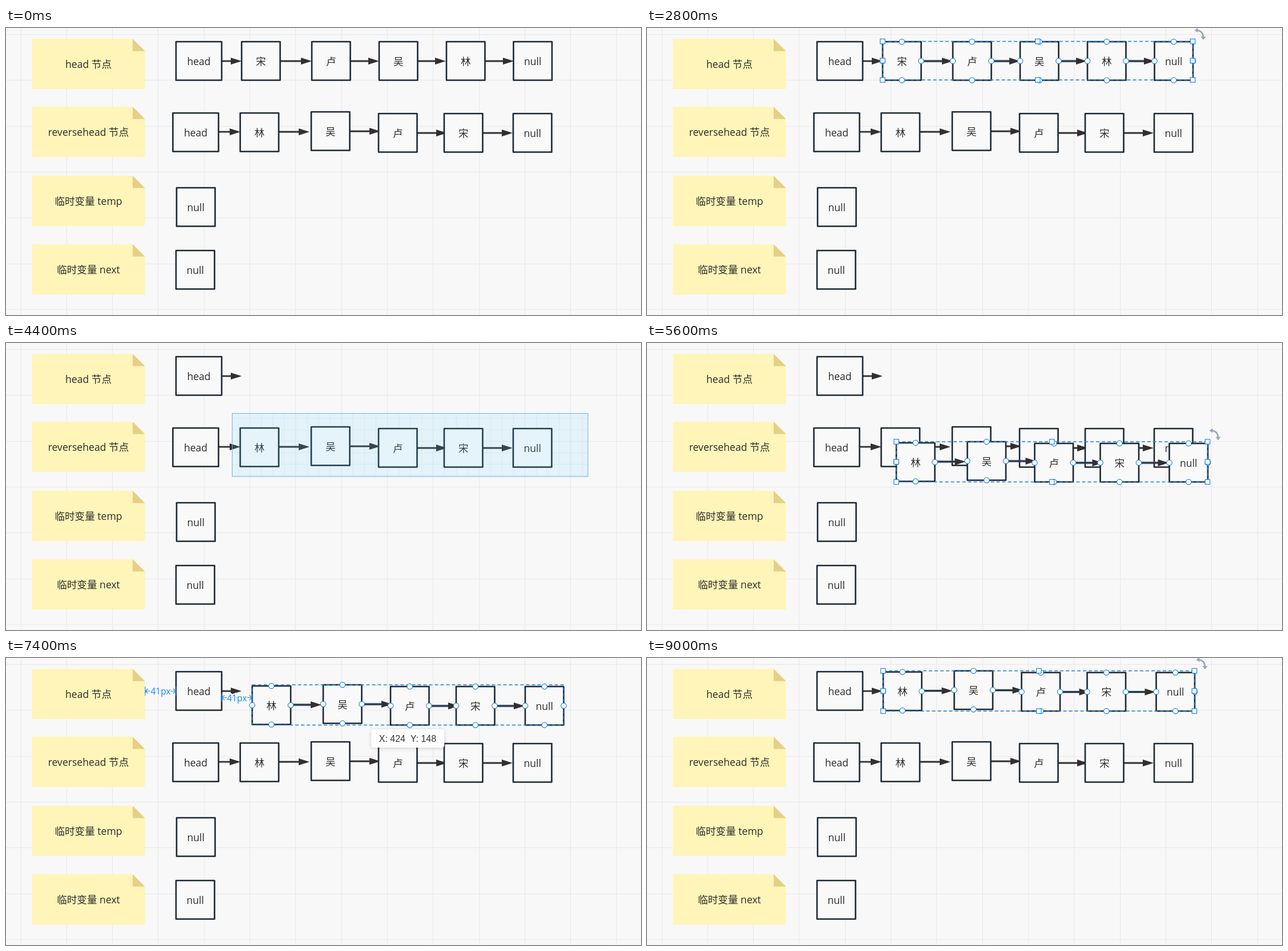
An HTML page for the animation above (9200 ms loop, 1113 by 503 pixels).

```html
<!DOCTYPE html>
<html lang="zh-CN">
<head>
<meta charset="utf-8">
<title>Linked list reversal</title>
<style>
  html, body { margin: 0; width: 100%; height: 100%; overflow: hidden; background: #f8f8f8; }
  svg { display: block; }
  text { font: 17.6px "Open Sans", "Noto Sans CJK SC", "Noto Sans CJK", sans-serif; fill: #2b2b2b; text-anchor: middle; white-space: pre; }
  .box { fill: #f9f9f9; stroke: #1c2733; stroke-width: 2.6; stroke-linejoin: round; }
  .line { stroke: #332f30; stroke-width: 2.8; }
  .tip { fill: #332f30; }
  .halo { stroke: #2a8cf0; stroke-opacity: .4; stroke-width: 5; }
  .knob { fill: #fff; stroke: #1a86e8; stroke-width: 1.2; }
  .dash { fill: none; stroke: #1a7fd8; stroke-width: 1.3; stroke-dasharray: 6 4; }
  .guide { fill: none; stroke: #1a86f0; stroke-width: 1.1; }
  .gap { font-size: 15.5px; fill: #1a86f0; stroke: #f8f8f8; stroke-width: 4; paint-order: stroke; }
  .tip-box { fill: #fff; filter: drop-shadow(0 1px 3px rgba(0, 0, 0, .18)); }
  .tip-text { font: 16px "Liberation Sans", Arial, sans-serif; fill: #333; text-anchor: start; }
</style>
</head>
<body>
<svg id="stage" width="1113" height="503" viewBox="0 0 1113 503">
  <defs>
    <pattern id="fine" x="25.5" y="11" width="20.083" height="20.083" patternUnits="userSpaceOnUse">
      <path d="M0 .5H21M.5 0V21" stroke="#e9ecef" fill="none"/>
    </pattern>
  </defs>
  <g id="base"></g>
  <g id="live"></g>
</svg>
<script>
const LOOP = 9200, TICK = 100, ZOOM = 1.32;
const GRID = 80.33, SIZE = 67.5;
const el = id => document.getElementById(id);

// Nodes are [label, x, y, width]; links are [x1, x2, y].
const heads = [["head", 298, 24, 80], ["head", 292.5, 149, 80]];
const headLinks = [[378, 413, 58], [373, 411, 182]];
const temps = [["null", 299, 280], ["null", 298, 390]];
const first = {
  nodes: [["宋", 413, 24], ["卢", 536, 24], ["吴", 654, 24], ["林", 772, 24], ["null", 889.5, 24]],
  links: [[481, 536, 58], [604, 654, 58], [722, 771, 58], [840, 890, 58]],
  frame: [413, 23.5, 543.5, 67.5]
};
const second = {
  nodes: [["林", 410.5, 149], ["吴", 535, 147], ["卢", 653, 150], ["宋", 768, 150], ["null", 889, 150]],
  links: [[479, 532, 182], [603, 656, 181], [721, 773, 184], [836, 888, 184]],
  frame: [410.5, 147, 545.5, 70.5]
};
const notes = [["head 节点", 19], ["reversehead 节点", 138], ["临时变量 temp", 259], ["临时变量 next", 379]];

// Keys are [time, x, y].
const sweepOne = [[1700, 450, 30], [1800, 640, 80], [1900, 802, 122], [2000, 910, 128], [2200, 1010, 132], [2400, 1050, 133]];
const sweepTwo = [[3800, 470, 170], [4000, 690, 240], [4100, 800, 252], [4400, 1020, 234]];
const drag = [[6700, 437, 173], [6800, 436, 174], [6900, 433, 173], [7000, 432, 160], [7200, 431, 90],
  [7400, 431.5, 47], [7700, 431, 42], [7900, 429, 40], [8300, 420, 28], [8600, 414, 22.5]];

function at(keys, t) {
  const i = keys.findIndex(k => k[0] > t);
  if (i === 0) return keys[0].slice(1);
  if (i < 0) return keys[keys.length - 1].slice(1);
  const a = keys[i - 1], b = keys[i], p = (t - a[0]) / (b[0] - a[0]);
  return [a[1] + (b[1] - a[1]) * p, a[2] + (b[2] - a[2]) * p];
}

const rect = (cls, x, y, w, h, extra = "") =>
  `<rect class="${cls}" x="${x}" y="${y}" width="${w}" height="${h}" ${extra}/>`;
const text = (s, x, y, cls = "") => `<text class="${cls}" x="${x}" y="${y}">${s}</text>`;
const path = (cls, d) => `<path class="${cls}" d="${d}"/>`;
const square = (x, y) => rect("knob", x - 4.2, y - 4.2, 8.4, 8.4);
const circle = (x, y) => `<circle class="knob" cx="${x}" cy="${y}" r="4.7"/>`;

const box = ([label, x, y, w = SIZE]) =>
  rect("box", x, y, w, SIZE) + text(label, x + w / 2, y + SIZE / 2 + 7.2);
const arrow = ([a, b, y]) =>
  path("line", `M${a} ${y}H${b - 15}`) + path("tip", `M${b} ${y}l-19 -6v12z`);
const halo = ([a, b, y]) => path("halo", `M${a} ${y}H${b - 12}`);
const each = (list, fn) => list.map(fn).join("");
const row = r => each(r.links, arrow) + each(r.nodes, box);

function ports([, x, y]) {
  const h = SIZE / 2;
  return circle(x + h, y) + circle(x + SIZE, y + h) + circle(x + h, y + SIZE) + circle(x, y + h);
}

function rotor(x, y) {
  return `<g transform="translate(${x} ${y})"><path d="M6 -19.5Q18.5 -19 18.5 -6.5" fill="none" stroke="#9aa5b8" stroke-width="2.6"/>
    <path d="M3 -19.5l6 -4v8zM18.5 -2.5l-4.5 -6h9z" fill="#9aa5b8"/></g>`;
}

function selection(r, resting = true) {
  const [x, y, w, h] = r.frame, xs = [x, x + w / 2, x + w], ys = [y, y + h / 2, y + h];
  let s = rect("dash", x, y, w, h) + each(r.nodes, ports);
  if (resting) {
    xs.forEach((px, i) => ys.forEach((py, j) => { if (i !== 1 || j !== 1) s += square(px, py); }));
    s += rotor(x + w, y);
  }
  return s;
}

function guide(a, b, y) {
  return path("guide", `M${a} ${y - 8}v16M${b} ${y - 8}v16M${a} ${y}H${b}M${a + 5} ${y - 4}l-5 4l5 4M${b - 5} ${y - 4}l5 4l-5 4`) +
    text("41px", (a + b) / 2, y + 6, "gap");
}

function tooltip(left, top) {
  const [, , w, h] = second.frame, x = left + w / 2 - 64, y = top + h + 7.5;
  const px = Math.round(424 + (left - 431.5) / ZOOM), py = Math.round(148 + (top - 47) / ZOOM);
  return rect("tip-box", x, y, 128, 32, 'rx="4"') +
    text("X: " + px, x + 13.5, y + 22, "tip-text") + text("Y: " + py, x + 68.5, y + 22, "tip-text");
}

function copy(t) {
  const [left, top] = at(drag, t), dragging = t >= 6800 && t < 8800;
  const dx = left - second.frame[0], dy = top - second.frame[1];
  const halos = each(second.links, halo), arrows = each(second.links, arrow), boxes = each(second.nodes, box);
  let s = `<g transform="translate(${dx} ${dy})">` +
    (t < 8800 ? boxes + halos + arrows : halos + arrows + boxes) + selection(second, !dragging) + "</g>";
  if (t >= 7200 && t < 7900) s += guide(244, 298, 58) + guide(378, left, (top + 92) / 2);
  if (dragging) s += tooltip(left, top);
  return s;
}

function drawBase() {
  let s = "", d = "";
  for (let x = 25.5; x < 1113; x += GRID) d += `M${Math.round(x) + .5} 0V503`;
  for (let y = 11; y < 503; y += GRID) d += `M0 ${Math.round(y) + .5}H1113`;
  s += `<path d="${d}" stroke="#e9e9ea"/>`;
  for (const [label, y] of notes) {
    s += `<path d="M45.5 ${y}H222L243.5 ${y + 21.5}V${y + 88}H45.5z" fill="#fff5b8"/>` +
      `<path d="M222 ${y}l21.5 21.5H222z" fill="#e6cf86"/>` + text(label, 144.5, y + 51);
  }
  el("base").innerHTML = s;
}

function draw(t) {
  const during = (a, b) => t >= a && t < b;
  const one = during(1700, 2800), sweep = one || during(3800, 5000);
  let under = "", over = "";
  if (sweep) {
    const [x, y] = one ? [389.5, 2.5] : [396.5, 123.5];
    const [ex, ey] = at(one ? sweepOne : sweepTwo, t), size = [x, y, ex - x, ey - y];
    under = rect("", ...size, 'fill="url(#fine)"');
    over = rect("", ...size, 'fill="#5acdff" fill-opacity=".13" stroke="#6fb1e4"');
  }
  let s = under + each(headLinks, arrow) + each(heads, box) + each(temps, box);
  if (t < 2900) {
    if (t >= 2800) s += each(first.links, halo);
    s += row(first);
    if (t >= 2800) s += selection(first);
  }
  if (during(5000, 5600)) s += each(second.links, halo);
  s += row(second);
  if (during(5000, 5600)) s += selection(second);
  if (during(300, 400)) s += ports(first.nodes[1]);
  if (during(700, 1100)) s += ports(first.nodes[0]);
  if (during(3300, 3600)) s += ports(second.nodes[0]);
  if (t >= 5600) s += copy(t);
  el("live").innerHTML = s + over;
}

let last = -1;
const start = performance.now();
function step() {
  const t = Math.floor(((performance.now() - start) % LOOP) / TICK) * TICK;
  if (t !== last) draw(last = t);
  requestAnimationFrame(step);
}
drawBase();
step();
</script>
</body>
</html>
```
